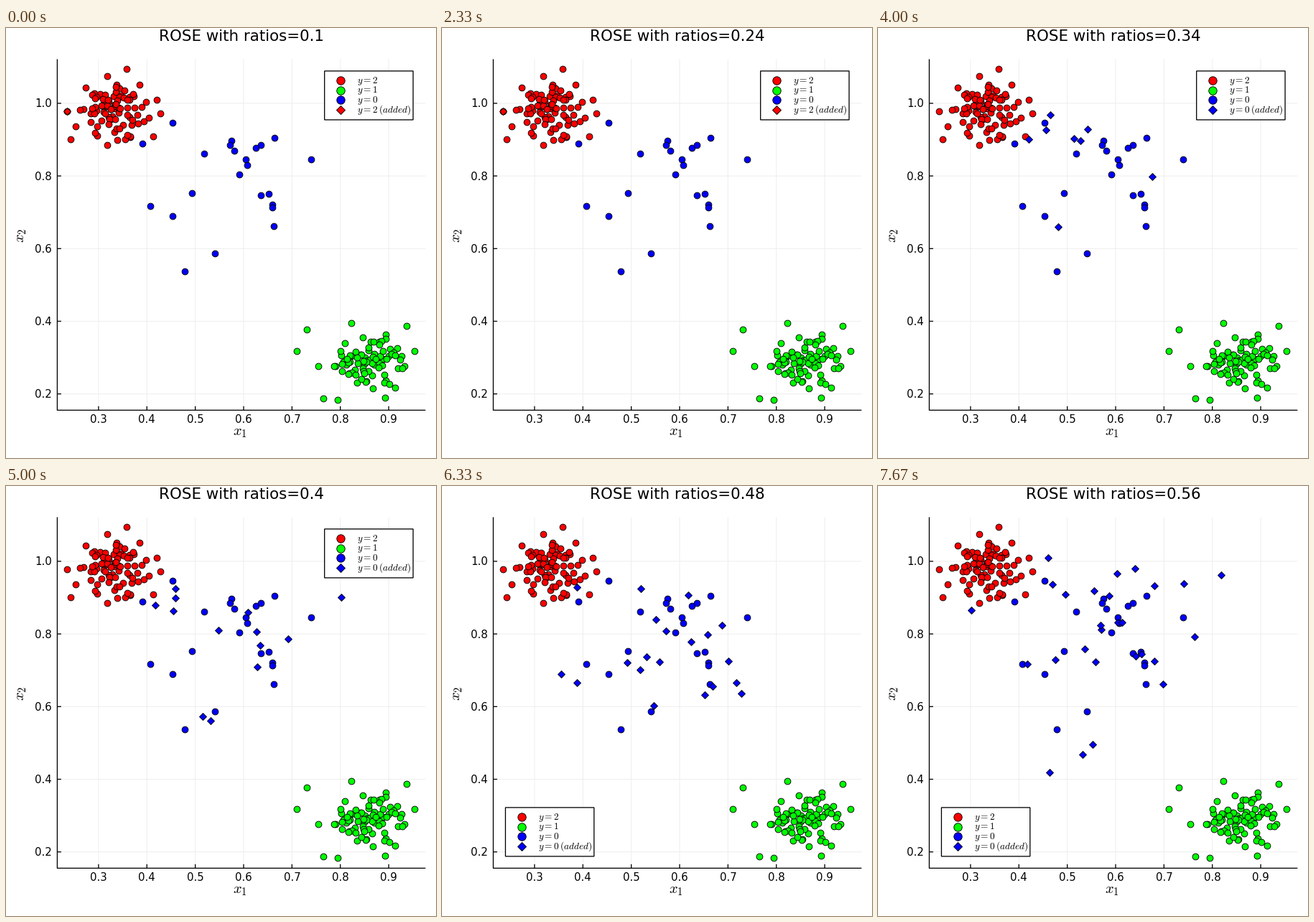
Write a matplotlib script that moves like this. It is 599 px wide and 599 px high and loops after 8000 ms.

```python
import numpy as np
import matplotlib.pyplot as plt
from matplotlib.animation import FuncAnimation
from matplotlib.patches import Rectangle
from matplotlib.transforms import Affine2D

SIZE, DPI = 599, 100
INTERVAL, FRAMES = 50, 160
RED, GREEN, BLUE = "#ff0000", "#00ff00", "#0000ff"
LEFT, RIGHT, TOP, BOTTOM = 72, 585, 44, 533
LOW_LEGEND = {46, 48, 54, 56}  # ratios in percent

plt.rcParams["font.family"] = "DejaVu Sans"
plt.rcParams["mathtext.fontset"] = "cm"

# Stage coordinates, y pointing down.
RED_RIM = [(169, 58), (142, 68), (187, 80), (112, 84), (211, 101), (86, 117),
           (91, 156), (98, 138), (142, 164), (174, 153), (206, 152), (216, 120)]
GREEN_RIM = [(482, 412), (420, 421), (406, 451), (559, 416), (570, 451),
             (530, 428), (436, 472), (443, 517), (463, 519), (529, 516),
             (543, 502), (556, 472)]
MINORITY = np.array([
    (232.5, 132.5), (191, 162), (277, 176), (315, 157.5), (313, 163.5),
    (318.5, 172), (349, 168), (356, 164), (375, 154), (335, 183.5),
    (336.5, 191.5), (325.5, 205), (426, 183.5), (260, 230.5), (356, 234),
    (366.5, 232), (371.5, 247), (371.5, 251), (374, 277), (201.5, 248.5),
    (233, 263), (292, 314.5), (250, 340)])


def px(n):
    return n * 72 / DPI


def cluster(rim, center, spread, seed, count=90):
    """Rim points around a core of normal noise cut off at two sigma."""
    noise = np.random.default_rng(seed).normal(size=(4 * count, 2))
    core = noise[np.hypot(*noise.T) < 2][:count - len(rim)]
    return np.vstack([rim, center + core * spread])


def added_points(percent):
    """Smoothed bootstrap: random minority points plus normal noise."""
    if percent < 28:
        return np.array([(86, 117)])
    rng = np.random.default_rng(percent)
    count = round(0.9 * percent) - len(MINORITY)
    picks = MINORITY[rng.integers(len(MINORITY), size=count)]
    return picks + rng.normal(0, 30, (count, 2)).clip(-60, 60)


fig = plt.figure(figsize=(SIZE / DPI, SIZE / DPI), dpi=DPI, facecolor="white")
ax = fig.add_axes([0, 0, 1, 1])
ax.set(xlim=(0.6, SIZE + 0.6), ylim=(SIZE + 0.6, 0.6))
ax.axis("off")


def line(xs, ys, color="black", width=1.3, z=1):
    ax.plot(xs, ys, color=color, lw=px(width), zorder=z, snap=False,
            solid_capstyle="butt")


def markers(points, color, shape="o", size=8.8, z=3, **kw):
    return ax.plot(*np.transpose(points), ls="", marker=shape, ms=px(size),
                   mfc=color, mec="black", mew=px(0.9), zorder=z, snap=False,
                   **kw)[0]


def label(x, y, text, size, ha="center", **kw):
    return ax.text(x, y, text, fontsize=px(size), ha=ha, va="baseline", **kw)


for k in range(7):
    x = 129.5 + 67.37 * k
    line([x, x], [TOP, BOTTOM], "#eeeeee", 1, 0)
    line([x, x], [BOTTOM, BOTTOM - 5.5])
    label(x, 551, f"0.{k + 3}", 15)
for k in range(5):
    y = 510.3 - 101.2 * k
    line([LEFT, RIGHT], [y, y], "#eeeeee", 1, 0)
    line([LEFT, LEFT + 5.5], [y, y])
    label(64.5, y + 5.5, f"{0.2 + 0.2 * k:.1f}", 15, "right")
line([LEFT, LEFT, RIGHT], [TOP, BOTTOM, BOTTOM])

label(326.5, 568.5, "$x_1$", 20.5)
label(26.5, 290, "$x_2$", 20.5, rotation=90, rotation_mode="anchor")
title = label(328.5, 18.8, "", 21.4)

markers(cluster(RED_RIM, (153, 119), (27, 20), 5), RED)
markers(cluster(GREEN_RIM, (504, 464), (27, 20), 8), GREEN)
markers(MINORITY, BLUE)
added = markers([(86, 117)], RED, "D", 7, 4)

legend_shift = Affine2D()
legend_space = legend_shift + ax.transData
ax.add_patch(Rectangle((444.3, 60.5), 123.4, 68, fc="white", ec="black",
                       lw=px(1.3), zorder=5, snap=False,
                       transform=legend_space))


def legend_row(y, color, text, shape="o", size=11.4):
    key = markers([(467, y)], color, shape, size, 6, transform=legend_space)
    name = label(489.5, y + 3.6, text, 13.3, "left", zorder=6,
                 transform=legend_space)
    return key, name


legend_row(74, RED, "$y = 2$")
legend_row(87.5, GREEN, "$y = 1$")
legend_row(101, BLUE, "$y = 0$")
added_key, added_name = legend_row(114.5, RED, "", "D", 8.3)


def update(i):
    step = (3 * i + 2) // 20  # three steps per second
    percent = 10 + 2 * step
    title.set_text(f"ROSE with ratios={percent / 100:g}")
    cls, color = (2, RED) if percent < 28 else (0, BLUE)
    added.set_data(*added_points(percent).T)
    added.set_markerfacecolor(color)
    added_key.set_markerfacecolor(color)
    added_name.set_text(rf"$y = {cls}\,(added)$")
    legend_shift.clear()
    if percent in LOW_LEGEND:
        legend_shift.translate(-355.3, 388)
    return title, added, added_key, added_name


anim = FuncAnimation(fig, update, frames=FRAMES, interval=INTERVAL,
                     repeat=True, repeat_delay=0, blit=False)
plt.show()
```
